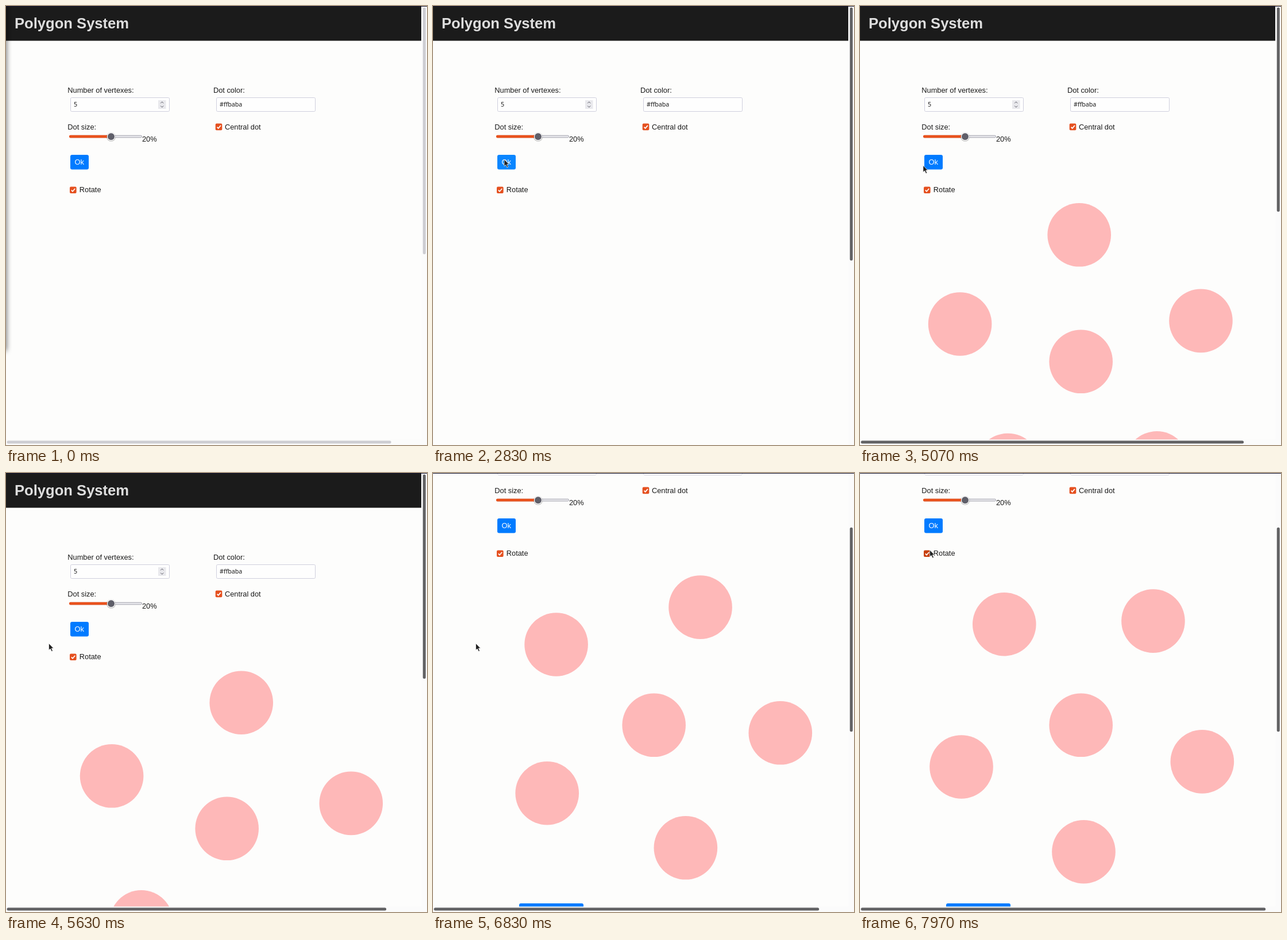
Animation, 733 px wide and 764 px high, one loop 8000 ms. Source, as an HTML page:

```html
<!DOCTYPE html>
<html lang="en">
<head>
<meta charset="utf-8">
<title>Polygon System</title>
<style>
html, body { margin: 0; width: 100%; height: 100%; overflow: hidden; background: #fdfdfc; }
svg { display: block; width: 100%; height: 100%; }
text { font: 12.8px "Liberation Sans", Arial, sans-serif; fill: #1a1a1a; }
text.title { font-size: 25.6px; font-weight: bold; fill: #dedede; }
text.value { font: 500 10.67px "Noto Sans", "Open Sans", sans-serif; }
.field { fill: #fefefe; stroke: #cfcfdd; }
.check path { fill: none; stroke: #fff; stroke-width: 1.7; }
.bar { fill: #fbfbfb; }
</style>
</head>
<body>
<svg viewBox="0 0 733 764">
  <defs>
    <filter id="blur" x="-100%" y="-10%" width="300%" height="120%"><feGaussianBlur stdDeviation="5"/></filter>
    <g id="box" class="check"><rect width="11.6" height="11.6" rx="2"/><path d="M2.8 6L5 8.3L9.2 3.3"/></g>
  </defs>
  <rect width="733" height="764" fill="#fdfdfc"/>
  <g id="page">
    <rect width="723" height="60.5" fill="#1b1b1b"/>
    <text class="title" x="15" y="39">Polygon System</text>

    <text x="107.3" y="151">Number of vertexes:</text>
    <rect class="field" x="112.5" y="159.5" width="172" height="24" rx="2"/>
    <text class="value" x="118" y="175">5</text>
    <rect x="265" y="164" width="13.5" height="15" fill="#e9e9ed"/>
    <path d="M269.2 169.3l2.5-2.6 2.5 2.6M269.2 173.7l2.5 2.6 2.5-2.6" fill="none" stroke="#5b5b66"/>

    <text x="361" y="151">Dot color:</text>
    <rect class="field" x="366.5" y="159.5" width="172" height="24" rx="2"/>
    <text class="value" x="372" y="175">#ffbaba</text>

    <text x="107.3" y="214.5">Dot size:</text>
    <rect x="110.5" y="225.3" width="126" height="3.6" rx="1.8" fill="#e9e9ed" stroke="#9b9ba6" stroke-width=".9"/>
    <rect x="110" y="224.7" width="73" height="4.8" rx="2" fill="#e9521d"/>
    <circle cx="183" cy="227.8" r="8" fill="#000" opacity=".22"/>
    <circle cx="183" cy="227.2" r="7.2" fill="#fff"/>
    <circle cx="183" cy="227.2" r="6" fill="#5f5f69"/>
    <text x="237" y="236">20%</text>

    <use href="#box" x="364.7" y="204.6" fill="#e5501f"/>
    <text x="381" y="214.5">Central dot</text>

    <rect id="ok" x="112" y="259" width="32" height="25.5" rx="3"/>
    <text x="127.7" y="276" text-anchor="middle" style="fill:#fff">Ok</text>

    <use id="rotate" href="#box" x="111" y="314.4"/>
    <text x="127.8" y="324">Rotate</text>

    <g id="dots" fill="#feb8b8"></g>
    <rect x="150" y="929" width="112" height="26" rx="3" fill="#007bff"/>
  </g>

  <rect id="shade" x="-40" y="-40" width="41" height="640" fill="#000" opacity=".55" filter="url(#blur)"/>
  <rect class="bar" x="723.5" width="9.5" height="764"/>
  <rect id="vThumb" x="725.8" width="5" rx="2.5"/>
  <g id="hBar">
    <rect class="bar" y="754.5" width="733" height="9.5"/>
    <rect id="hThumb" x="1.5" y="756.6" height="5" rx="2.5"/>
  </g>
  <rect width="733" height="1" fill="#11112c"/>
  <path id="cursor" d="M0 0V11.8L2.7 9.4L4.9 14L6.9 13L4.8 8.6H8.3Z" fill="#202020" stroke="#fff" stroke-width=".7"/>
</svg>
<script>
const LOOP = 8000;
const CENTER = [384.7, 618.8], RING = 220.5, DOT = 55.3;
const FOCUS = 2550, BAR_OFF = 1330, BAR_ON = 2870, DRAWN = 4470;

// [time, degrees away from the widest pose]
const TURN = [[0, 11.5], [1330, 28.5], [2870, -30], [3570, -25.6], [4470, -17.6],
  [5630, -2.5], [6170, 4.6], [6830, 12.5], [7970, 25.75], [8000, 26.1]];
// [time, x, y]
const POINTER = [[4800, 124, 267], [5270, 101, 284], [5480, 74.5, 296.5], [6920, 74.5, 296.5],
  [7300, 94, 190], [7740, 117, 108], [7930, 121.5, 134]];

const $ = id => document.getElementById(id);
const set = (el, attrs) => { for (const k in attrs) el.setAttribute(k, attrs[k]); };
const show = (el, on) => set(el, { visibility: on ? 'visible' : 'hidden' });
const clamp = v => Math.min(1, Math.max(0, v));
const ease = v => v * v * (3 - 2 * v);

function track(keys, t, curve = v => v) {
  const i = Math.max(1, keys.findIndex(k => k[0] >= t));
  const a = keys[i - 1], b = keys[i];
  if (t >= keys[keys.length - 1][0]) return keys[keys.length - 1].slice(1);
  const p = curve(clamp((t - a[0]) / (b[0] - a[0])));
  return a.slice(1).map((v, n) => v + (b[n + 1] - v) * p);
}

function pointer(t) {
  if (t >= POINTER[0][0]) return track(POINTER, t, ease);
  const p = ease(clamp((t - 1930) / 720)), q = 1 - p;
  return [[-10, 45, 124], [500, 468, 267]].map(([a, b, c]) => q * q * a + 2 * q * p * b + p * p * c);
}

const dots = Array.from({ length: 6 }, () => {
  const dot = document.createElementNS('http://www.w3.org/2000/svg', 'circle');
  set(dot, { r: DOT, cx: CENTER[0], cy: CENTER[1] });
  return $('dots').appendChild(dot);
});

function draw(t) {
  const scroll = 180 * ease(clamp((t - 5780) / 280));
  const [turn] = track(TURN, t);
  const [x, y] = pointer(t);
  const drawn = t >= DRAWN;
  const bar = t < BAR_OFF || t >= BAR_ON;
  const color = t < FOCUS ? '#cdcdd2' : '#626264';
  const over = (l, top, w, h) => x >= l && x <= l + w && y + scroll >= top && y + scroll <= top + h;

  set($('page'), { transform: `translate(0 ${-scroll})` });
  show($('dots'), drawn);
  dots.slice(1).forEach((dot, i) => {
    const a = (turn - 81 + i * 72) * Math.PI / 180;
    set(dot, { cx: CENTER[0] + RING * Math.cos(a), cy: CENTER[1] + RING * Math.sin(a) });
  });

  const vLength = drawn ? 355.5 : bar ? 429.5 : 440.5;
  set($('vThumb'), { y: 2.5 + scroll * 0.512, height: vLength, fill: color });
  show($('hBar'), bar);
  set($('hThumb'), { width: Math.min(721, 661.2 + 0.067 * turn * turn) - 1, fill: color });

  set($('ok'), { fill: over(112, 259, 32, 25) ? '#0a86ff' : '#007bff' });
  set($('rotate'), { fill: over(111, 312, 54, 16) ? '#c8400f' : '#e5501f' });
  show($('shade'), t < FOCUS);
  show($('cursor'), t >= 1930);
  set($('cursor'), { transform: `translate(${x} ${y})` });
}

const start = performance.now();
function tick() {
  draw((performance.now() - start) % LOOP);
  requestAnimationFrame(tick);
}
tick();
</script>
</body>
</html>
```
